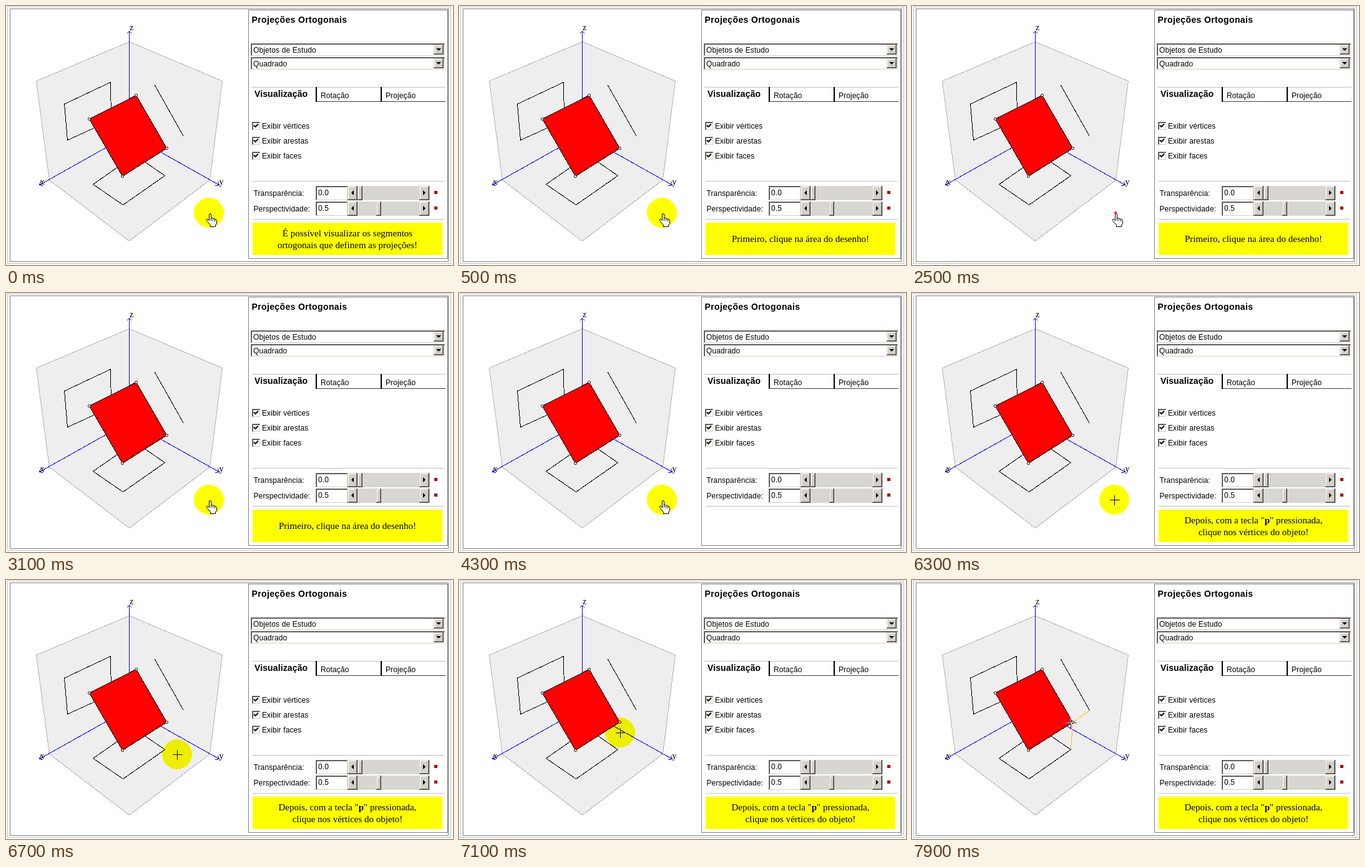
Write an HTML page that moves like this. It is 716 px wide and 416 px high and loops after 8000 ms.

```html
<!DOCTYPE html>
<html lang="pt">
<head>
<meta charset="utf-8">
<title>Projeções Ortogonais</title>
<style>
  html, body { margin: 0; width: 716px; height: 416px; overflow: hidden; background: #fff; }
  svg { display: block; }
  text { font: 12px "Liberation Sans", Arial, sans-serif; letter-spacing: .12px; }
  .bold { font-weight: bold; font-size: 14px; }
  .title { letter-spacing: .37px; }
  .axis text { font: 14px "Liberation Serif", Times, serif; }
  .note text { font: 15px "Liberation Serif", Times, serif; letter-spacing: 0; text-anchor: middle; }
  .note tspan { font-weight: bold; }
  .line { fill: none; stroke: #000; shape-rendering: crispEdges; }
  .blue { stroke: #00f; }
  .frame { stroke: #808080; }
  .wall { fill: #eee; stroke: #b4b4b4; }
  .ray { stroke: #ffc020; }
  rect { shape-rendering: crispEdges; }
  #spot { fill: #ff0; mix-blend-mode: multiply; shape-rendering: crispEdges; }
  #cross { stroke: #fff; mix-blend-mode: difference; shape-rendering: crispEdges; }
  #ring { stroke: #f00; }
</style>
</head>
<body>
<svg width="716" height="416" viewBox="0 0 716 416">
  <rect width="716" height="416" fill="#fff"/>
  <g transform="translate(.5 .5)">
    <path class="line" style="stroke:#c0c0c0" d="M2 1H712V413H2Z"/>
    <path class="line frame" d="M6 4H708V410H6Z"/>
    <path class="line wall" d="M197 57L346 120L326 279L197 377L69 279L48 120Z"/>
    <g class="axis">
      <path class="line blue" d="M197 206V40M193 44L197 40L201 44M197 206L53 287M55 282L53 287L59 288M197 206L341 287M339 282L341 287L335 288"/>
      <text x="197.5" y="38">z</text><text x="54" y="286">x</text><text x="341" y="286">y</text>
    </g>
    <path class="line" d="M93 157L167 122L168 183L98 215ZM139 286L187 319L254 272L206 239ZM238 127L284 209"/>
    <path id="rays" class="line ray" d="M284 209L257 228L254 272"/>
    <path class="line" style="fill:#f00" d="M208 143L257 228L186 273L133 181Z"/>
    <g id="dots" fill="#fff" stroke="#000"></g>
  </g>
  <g id="panel"></g>
  <g id="notes"></g>
  <path id="cross" d="M-7.5 0H8.5M0-7.5V8.5"/>
  <circle id="spot" cx="-.5" cy="-.5" r="24"/>
  <g id="hand" fill="#fff" stroke="#000">
    <path d="M325.5 345V335q0-1.5 1.5-1.5t1.5 1.5V340.5q3-.5 3 1q3-.5 3 1q3 0 3 2V349l-2 3V354.5H327.5V352l-6-7.5q-.5-3 2-2l2 2z"/>
    <path d="M328.5 340V345M331.5 341V345M334.5 342V346" fill="none"/>
  </g>
  <circle id="ring" cx="326" cy="332"/>
</svg>
<script>
const $ = id => document.getElementById(id);
const rect = (x, y, w, h, fill) => `<rect x="${x}" y="${y}" width="${w}" height="${h}" fill="${fill}"/>`;
const text = (x, y, s, cls = '') => `<text x="${x}" y="${y}" class="${cls}">${s}</text>`;
const FACE = '#d4d0c8', DARK = '#808080', BLACK = '#404040', PALE = '#c0c0c0';

const raised = (x, y, w, h) => rect(x, y, w, h, BLACK) + rect(x, y, w - 1, h - 1, FACE) +
  rect(x + 1, y + 1, w - 2, h - 2, DARK) + rect(x + 1, y + 1, w - 3, h - 3, '#fff') +
  rect(x + 2, y + 2, w - 4, h - 4, FACE);
const sunken = (x, y, w, h) => rect(x, y, w, h, DARK) + rect(x + 1, y + 1, w - 1, h - 1, FACE) +
  rect(x + 1, y + 1, w - 2, h - 2, BLACK) + rect(x + 2, y + 2, w - 3, h - 3, '#fff');
const arrow = d => `<path d="${d}z"/>`;

const select = (y, label) => sunken(392, y, 311, 20) + text(396, y + 15, label) +
  raised(685, y + 2, 16, 16) + arrow(`M689 ${y + 8}h8l-4 4`);

const checkbox = (y, label) => sunken(394, y, 13, 13) + text(410, y + 11, label) +
  `<path d="M397 ${y + 5.5}l2.5 2.5l4.5-4.5" fill="none" stroke="#000" stroke-width="2"/>`;

const slider = (y, label, value, thumb) => text(396.5, y + 16, label) +
  sunken(496, y, 51, 23) + text(500, y + 15, value) + rect(547, y, 132, 23, '#d8d6d0') +
  raised(547, y, 16, 23) + arrow(`M557 ${y + 7}v8l-4-4`) +
  raised(662, y, 16, 23) + arrow(`M668 ${y + 7}v8l4-4`) +
  raised(thumb, y, 8, 23) + rect(686, y + 8, 5, 5, '#b00000');

$('panel').innerHTML =
  '<path class="line frame" style="fill:#fff" d="M388.5 6.5H707.5V405.5H388.5Z"/>' +
  text(393.5, 27, 'Projeções Ortogonais', 'bold title') +
  select(60, 'Objetos de Estudo') + select(82, 'Quadrado') +
  rect(393, 130, 311, 1, PALE) + rect(497, 153, 207, 1, BLACK) +
  rect(496, 130, 2, 24, '#000') + rect(600, 130, 2, 24, '#000') +
  text(398, 146, 'Visualização', 'bold') + text(504, 148, 'Rotação') + text(608, 148, 'Projeção') +
  checkbox(186, 'Exibir vértices') + checkbox(210, 'Exibir arestas') + checkbox(234, 'Exibir faces') +
  rect(395, 281, 307, 1, PALE) + rect(395, 342, 307, 1, PALE) +
  slider(289, 'Transparência:', '0.0', 563) + slider(314, 'Perspectividade:', '0.5', 593);

$('dots').innerHTML = [[208, 143], [133, 181], [186, 273], [257, 228]]
  .map(([x, y]) => `<circle cx="${x}" cy="${y}" r="2"/>`).join('');

const notes = [
  ['É possível visualizar os segmentos', 'ortogonais que definem as projeções!'],
  ['Primeiro, clique na área do desenho!'],
  ['Depois, com a tecla "<tspan>p</tspan>" pressionada,', 'clique nos vértices do objeto!']
];
$('notes').innerHTML = notes.map(lines => '<g class="note">' + rect(395, 348, 304, 52, '#ff0') +
  lines.map((s, i) => text(547, (lines[1] ? 370 : 379) + i * 19, s)).join('') + '</g>').join('');

// pointer stops: time, x, y
const stops = [
  [0, 325.5, 332.5], [6300, 324.5, 332.5], [6500, 295.5, 312.5], [6700, 274.5, 280.5],
  [6900, 265.5, 261.5], [7100, 258.5, 245.5], [7300, 254.5, 231.5], [7500, 254.5, 229.5]
];
const show = (id, on) => $(id).style.display = on ? '' : 'none';

function draw(t) {
  const [, x, y] = stops.findLast(s => s[0] <= t);
  const note = t < 500 ? 0 : t < 4300 ? 1 : t < 4500 ? -1 : 2;
  [...$('notes').children].forEach((g, i) => g.style.display = i === note ? '' : 'none');

  const clicked = t >= 7900, clicking = t >= 2500 && t < 3100;
  show('rays', clicked);
  show('hand', t < 4900);
  show('cross', t >= 4900);
  show('spot', !clicking && !clicked);
  show('ring', clicking);
  for (const id of ['cross', 'spot']) $(id).setAttribute('transform', `translate(${x} ${y})`);

  const step = Math.floor((t - 2500) / 200);
  $('ring').setAttribute('r', [1.5, 3.5, 10.5][step] || 0);
  $('ring').setAttribute('fill', step ? 'none' : '#f00');
}

const start = performance.now();
function tick() {
  draw((performance.now() - start) % 8000);
  requestAnimationFrame(tick);
}
tick();
</script>
</body>
</html>
```
